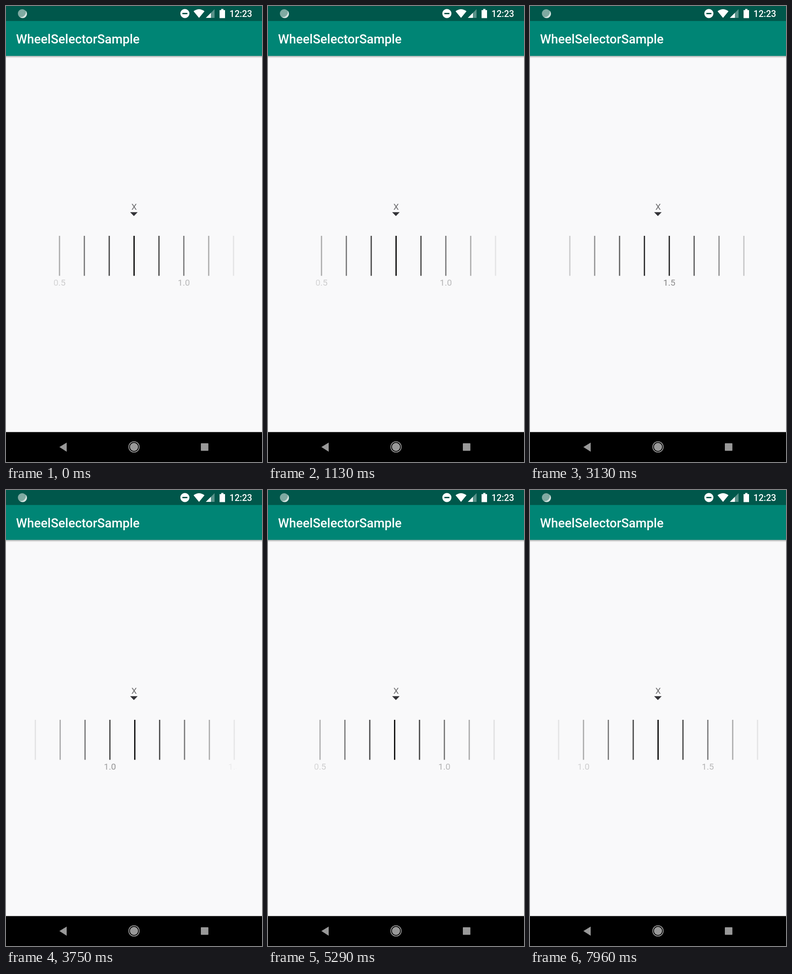
An HTML page that plays this animation: 561x998 px, repeating every 8000 ms.

```html
<!DOCTYPE html>
<html lang="en">
<head>
<meta charset="utf-8">
<title>Wheel selector</title>
<style>
  html, body { margin: 0; width: 100%; height: 100%; overflow: hidden; background: #f9f9fa; }
  svg { display: block; width: 100vw; height: 100vh; }
  text { font: 19.1px Roboto, sans-serif; }
  .bar-text { font-weight: 500; fill: #fff; }
  .centered { text-anchor: middle; }
</style>
</head>
<body>
<svg viewBox="0 0 561 998">
  <defs>
    <linearGradient id="shadow" x2="0" y2="1">
      <stop stop-opacity=".3"/>
      <stop offset="1" stop-opacity="0"/>
    </linearGradient>
    <linearGradient id="fade" gradientUnits="userSpaceOnUse" x1="55" x2="506">
      <stop stop-color="#fff" stop-opacity=".05"/>
      <stop offset=".137" stop-color="#fff" stop-opacity=".31"/>
      <stop offset=".379" stop-color="#fff" stop-opacity=".72"/>
      <stop offset=".5" stop-color="#fff"/>
      <stop offset=".621" stop-color="#fff" stop-opacity=".72"/>
      <stop offset=".863" stop-color="#fff" stop-opacity=".31"/>
      <stop offset="1" stop-color="#fff" stop-opacity=".05"/>
    </linearGradient>
    <mask id="window" maskUnits="userSpaceOnUse" x="54" y="480" width="451" height="150">
      <rect x="54" y="480" width="451" height="150" fill="url(#fade)"/>
    </mask>
  </defs>

  <rect width="561" height="998" fill="#f9f9fa"/>
  <rect y="109" width="561" height="5" fill="url(#shadow)"/>
  <rect y="32" width="561" height="77.2" fill="#008575"/>
  <rect width="561" height="32.8" fill="#00574b"/>
  <text class="bar-text" x="22" y="81.5" style="font-size:27.55px">WheelSelectorSample</text>

  <!-- Status icons -->
  <circle cx="35.5" cy="16.5" r="9.5" fill="#80aaa2"/>
  <path d="M43 10a9.5 9.5 0 0 1-13 14a11 11 0 0 0 13-14" fill="#d5e3e0"/>
  <g fill="#fff">
    <circle cx="392" cy="16.5" r="10"/>
    <path d="M386.5 15h11v3h-11z" fill="#00574b"/>
    <path d="M411 11.5Q423 2.5 435 11.5L423 26z"/>
    <path d="M438 26L457 7V26z" opacity=".35"/>
    <path d="M438 26L449 15V26z"/>
    <path d="M468 9h3.5v-2.500h5V9h3.500v17.500h-12z"/>
  </g>
  <text class="bar-text" x="489.8" y="23.5" style="font-size:19.5px">12:23</text>

  <!-- Wheel -->
  <text class="centered" x="280.7" y="445.5" fill="#6c6c6e">X</text>
  <path d="M272 451.300h16.500l-8.250 8.500z" fill="#333337"/>
  <g mask="url(#window)"><g id="wheel"></g></g>

  <!-- Navigation bar -->
  <rect y="932.5" width="561" height="65.5"/>
  <g fill="#999">
    <path d="M117 965.3L133 955.500v20z"/>
    <circle cx="280.5" cy="965" r="9"/>
    <circle cx="280.5" cy="965" r="11.5" fill="none" stroke="#b0b0b0" stroke-width="1.5"/>
    <rect x="427" y="957" width="16.5" height="16.5" rx="1"/>
  </g>
</svg>
<script>
const LOOP = 8000, CENTER = 280.7, SPACING = 54.5, FIRST = 5, LAST = 30;
const wheel = document.getElementById('wheel');

// Each swipe: start ms, end ms, tick at start, tick at end
const swipes = [
  [2600, 3130, 8, 14.55],
  [3210, 4460, 14.55, 5],
  [4670, 5900, 5, 11],
  [6265, 6920, 11, 13]
];

function add(name, attributes, content = '') {
  const node = document.createElementNS('http://www.w3.org/2000/svg', name);
  for (const key in attributes) node.setAttribute(key, attributes[key]);
  node.textContent = content;
  wheel.append(node);
}

for (let tick = FIRST; tick <= LAST; tick++) {
  const x = tick * SPACING;
  add('rect', { x: x - 1.35, y: 503, width: 2.7, height: 87.5 });
  if (tick % 5 === 0) {
    add('text', { x, y: 611.5, class: 'centered', 'fill-opacity': 0.53 }, (tick / 10).toFixed(1));
  }
}

const ease = p => p < 0.5 ? 2 * p * p : 1 - 2 * (1 - p) ** 2;

function positionAt(time) {
  let position = swipes[0][2];
  for (const [start, end, from, to] of swipes) {
    if (time < start) break;
    position = from + (to - from) * ease(Math.min(1, (time - start) / (end - start)));
  }
  return position;
}

function draw() {
  const position = positionAt(performance.now() % LOOP);
  wheel.setAttribute('transform', `translate(${CENTER - position * SPACING} 0)`);
  requestAnimationFrame(draw);
}
draw();
</script>
</body>
</html>
```
